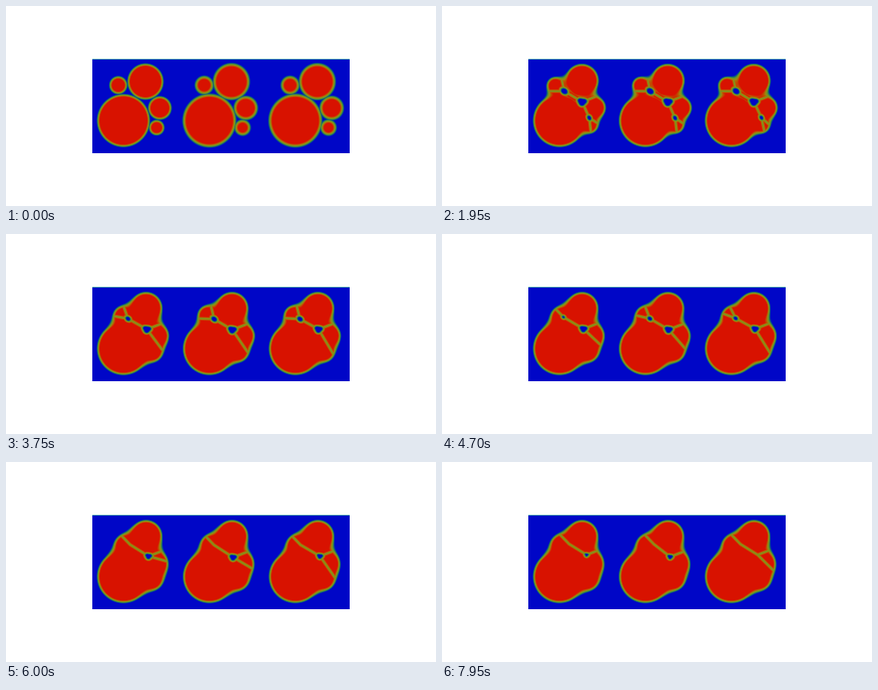
A matplotlib script that plays this animation: 538 px wide and 250 px high, repeating every 8 s.

```python
import numpy as np
import matplotlib.pyplot as plt
from matplotlib.animation import FuncAnimation

W, H, DPI = 538, 250, 100
STEP, FRAMES = 50, 160
TOP, BOTTOM = 67, 184
EDGES = [108, 215, 323, 430]
SHIFT = 107.5
NECKED = 1100  # all particles are joined from here on

# Signed distance from the surface -> colour
STOPS = [-2.2, -1.3, -0.5, 0.4, 1.2, 2.2]
COLOURS = np.array([(216, 18, 0), (190, 82, 0), (150, 140, 18),
                    (98, 150, 42), (16, 104, 115), (0, 6, 199)]) / 255

# Particles: (x, y, radius) at the start and when settled
BIG = np.array([(147, 143.2, 31.7), (147, 143.2, 31.6)])
CAP = np.array([(174.5, 94.5, 21.2), (175.3, 92.8, 18.9)])
SIDE = np.array([(192.5, 127.5, 13.3), (187.3, 127, 14)])
LOW = np.array([(188.5, 152, 8.3), (184, 148, 8.5)])
SMALL = np.array([(140.5, 99, 9.9), (148, 103, 9.5)])
PARTICLES = [BIG, CAP, SIDE, LOW, SMALL]

PORES = np.array([(153, 106.5), (175, 120), (183, 141)])

# When each grain is swallowed, how long the middle pore lives, its drift
PANELS = [
    dict(small=4500, low=2700, side=6950, pore=8500, drift=(6, -4)),
    dict(small=5500, low=2650, side=7700, pore=9500, drift=(3, -1.5)),
    dict(small=5200, low=2350, side=12000, pore=7650, drift=(5, -4)),
]


def progress(t, end, power):
    return min(1.0, t / end) ** power


def settle(t, tau):
    return 1 - np.exp(-t / tau)


def mix(a, b, f):
    return a + (b - a) * f


def polar(origin, length, degrees):
    a = np.radians(degrees)
    return origin + length * np.array([np.cos(a), np.sin(a)])


def smooth_min(a, b, k):
    h = np.maximum(k - np.abs(a - b), 0) / k
    return np.minimum(a, b) - h * h * k / 4


class Panel:
    def __init__(self, index, spec):
        self.index, self.spec = index, spec
        cols = np.arange(EDGES[index], EDGES[index + 1]) + 0.5 - SHIFT * index
        self.X, self.Y = np.meshgrid(cols, np.arange(TOP, BOTTOM) + 0.5)
        self.loose = np.min([self.disc(p[0]) for p in PARTICLES], axis=0)
        self.core = np.minimum(self.line(PORES[0], PORES[1]),
                               self.line(PORES[1], PORES[2])) - 5

    def disc(self, p):
        return np.hypot(self.X - p[0], self.Y - p[1]) - p[2]

    def line(self, a, b):
        (ax, ay), (dx, dy) = a, b - a
        u = ((self.X - ax) * dx + (self.Y - ay) * dy) / (dx * dx + dy * dy)
        u = np.clip(u, 0, 1)
        return np.hypot(self.X - ax - u * dx, self.Y - ay - u * dy)

    def pore(self, centre, rx, ry, tilt, lobes=0.0):
        if rx < 0.3:
            return np.full(self.X.shape, 99.0)
        a = np.radians(tilt)
        dx, dy = self.X - centre[0], self.Y - centre[1]
        u = (dx * np.cos(a) + dy * np.sin(a)) / rx
        v = (dy * np.cos(a) - dx * np.sin(a)) / ry
        edge = 1 + lobes * np.cos(3 * (np.arctan2(v, u) - np.pi / 2))
        return (np.hypot(u, v) - edge) * np.sqrt(rx * ry)

    def body(self, t):
        """Particles melted together, the joints filling up with time."""
        small = progress(t, self.spec["small"], 2)
        paces = [0, settle(t, 1800), settle(t, 3000), settle(t, 1500), small]
        k = 22 * settle(t, 1800)
        d = None
        for p, f in zip(PARTICLES, paces):
            disc = self.disc(mix(p[0], p[1], f))
            d = disc if d is None else smooth_min(d, disc, k)
        return np.minimum(d, self.core)

    def sintered(self, t):
        s = self.spec
        small = progress(t, s["small"], 8)
        low = progress(t, s["low"], 4)
        side = progress(t, s["side"], 4)
        late = np.clip((t - s["small"]) / 3000, 0, 1)

        p1 = PORES[0] + np.array([-1.5, -2.5]) * small + np.array([7.5, -1.5]) * late
        p2 = PORES[1] + np.array(s["drift"]) * (t / 8000) ** 2
        slope = mix(69, 60, low) - 80 * side
        p3 = polar(p2, 22, slope)

        # Boundaries run past the surface, where they do not show
        lines = [(p1, p2),
                 (p1, polar(p1, 28, mix(-102, -134, small))),
                 (p2, polar(p2, 26, -21))]
        if small < 1:
            lines.append((p1, polar(p1, 28, mix(-180, -134, small))))
        if low < 1:
            lines += [(p2, p3), (p3, polar(p3, 20, mix(20, slope, low))),
                      (p3, polar(p3, 20, mix(90, slope, low)))]
        elif side < 1:
            lines.append((p2, polar(p2, 45, slope)))

        r1, r2, r3 = (size * max(0, 1 - t / life) ** 0.28 for size, life in
                      [(6, s["small"] + 500), (7.2, s["pore"]), (4.8, s["low"] + 500)])
        d = self.body(t)
        for pore in (self.pore(p1, r1 * 1.08, r1 * 0.82, 35),
                     self.pore(p2, r2, r2 * 0.82, 8, 0.1),
                     self.pore(p3, r3 * 1.15, r3 * 0.85, 58)):
            d = np.maximum(d, -pore)
        for a, b in lines:
            d = np.maximum(d, 0.1 - 0.85 * self.line(a, b))
        return d

    def field(self, t):
        f = progress(t, NECKED, 0.5)
        d = mix(self.loose, self.sintered(max(t, NECKED)), f)
        if self.index:
            d = d / (1 + 0.3 * np.exp(-t / 60))
        return d


panels = [Panel(i, spec) for i, spec in enumerate(PANELS)]


def picture(frame):
    img = np.ones((H, W, 3))
    img[TOP - 1, EDGES[0]:EDGES[-1]] = (0.28, 0.63, 0.69)
    for panel, left, right in zip(panels, EDGES, EDGES[1:]):
        d = panel.field(frame * STEP)
        for c in range(3):
            img[TOP:BOTTOM, left:right, c] = np.interp(d, STOPS, COLOURS[:, c])
    return img


fig = plt.figure(figsize=(W / DPI, H / DPI), dpi=DPI, facecolor="white")
ax = fig.add_axes([0, 0, 1, 1])
ax.axis("off")
image = ax.imshow(picture(0), interpolation="nearest", aspect="auto")


def update(frame):
    image.set_data(picture(frame))
    return [image]


anim = FuncAnimation(fig, update, frames=FRAMES, interval=STEP,
                     repeat=True, repeat_delay=0, blit=False)
plt.show()
```
